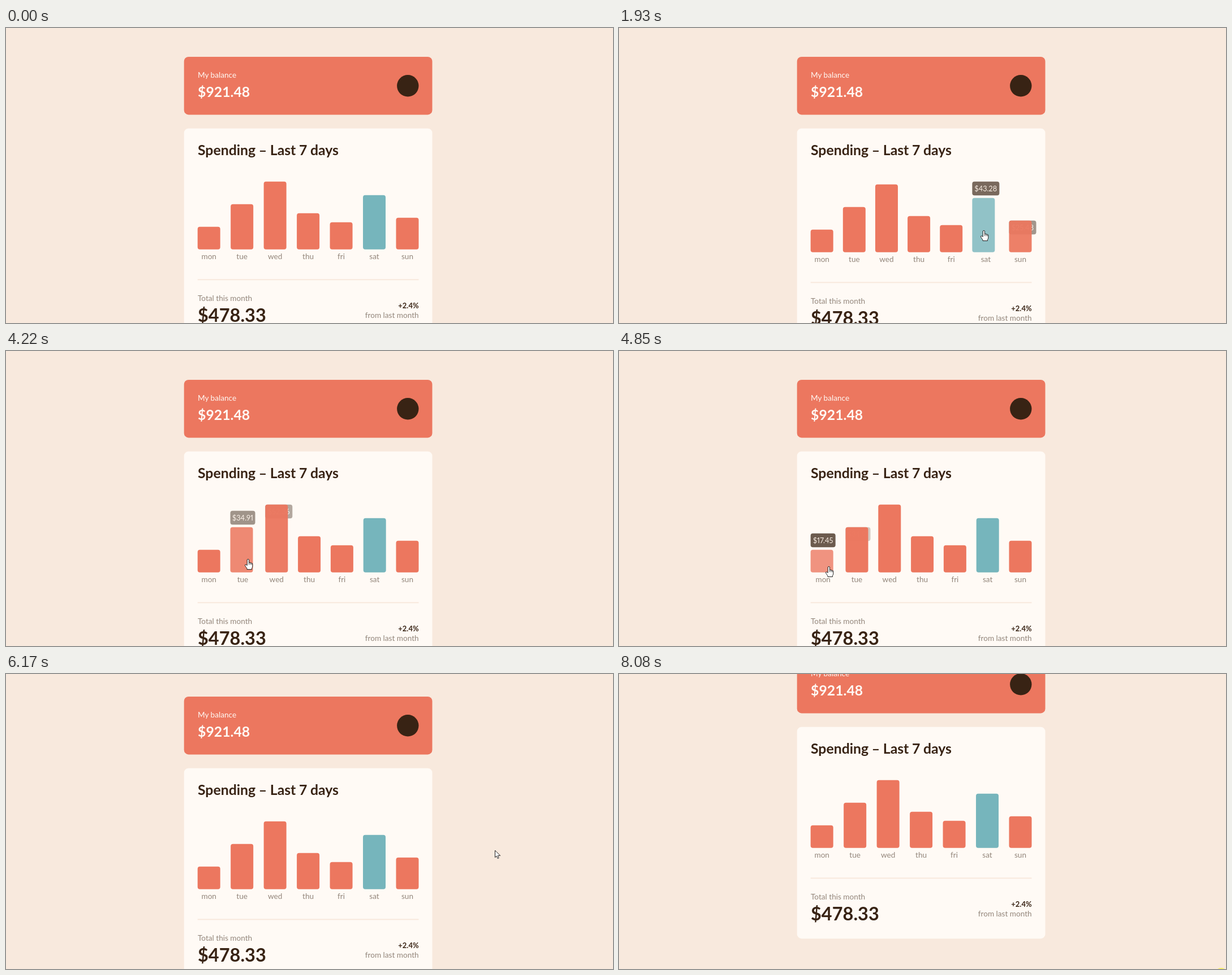
These frames come from a looping animation (1073x522 px, 8.15 s). An HTML page:

```html
<!DOCTYPE html>
<html lang="en">
<head>
<meta charset="utf-8">
<title>Spending chart</title>
<style>
  html, body { margin: 0; width: 100%; height: 100%; overflow: hidden; background: #f8e9dd; }
  svg { display: block; width: 100%; height: 100%; }
  text { font: 13.6px Lato, "Open Sans", sans-serif; fill: #93867b; }
  .light { fill: #fffaf5; }
  .dark { fill: #382314; }
  .coral { fill: #ec775f; }
  .cyan { fill: #76b5bc; }
  .bold { font-weight: 700; }
  .mid { text-anchor: middle; }
  .end { text-anchor: end; }
  .tip text { font-size: 12.7px; font-variant-numeric: proportional-nums; fill: #f8e9dd; }
  .cursor path { fill: #fff; stroke: #222; stroke-linejoin: round; stroke-linecap: round; }
</style>
</head>
<body>
<svg viewBox="0 0 1073 522">
  <g id="page">
    <rect class="coral" x="314.7" y="51" width="438.8" height="102.4" rx="8"/>
    <text class="light" x="339" y="88">My balance</text>
    <text class="light bold" x="339" y="122" style="font-size:24.8px">$921.48</text>
    <circle class="dark" cx="710.3" cy="102.3" r="19.2"/>

    <rect id="card" class="light" x="314.7" y="177.7" width="438.8" height="374.5" rx="8"/>
    <text class="dark bold" x="339" y="225" style="font-size:24.8px;word-spacing:-.4px">Spending – Last 7 days</text>
    <g id="lower">
      <g id="chart"></g>
      <rect x="338.7" y="444.3" width="390.8" height="2" fill="#f8e9dd"/>
      <text x="339" y="483">Total this month</text>
      <text class="dark bold" x="339" y="519.5" style="font-size:32.5px">$478.33</text>
      <text class="dark bold end" x="729.6" y="496" style="font-size:13px">+2.4%</text>
      <text class="end" x="729.6" y="513">from last month</text>
    </g>
  </g>
  <circle id="spot" cx="1064.5" cy="531.5" r="11.5" fill="#f4ee62"/>
  <g id="arrow" class="cursor">
    <path d="M.5 .5V12.6L3.2 10.1L5.2 14.5L7.2 13.6L5.3 9.3H9.3Z"/>
  </g>
  <g id="hand" class="cursor">
    <path d="M-1.7 11V2a1.6 1.6 0 0 1 3.2 0V6.6q1.6-.8 2.5.4q1.5-.7 2.2.6q1.6-.3 1.6 1.5V13q0 2-1.3 3.4V18.5H-2V16.8Q-3 15.4-5.5 11.7q-.6-2 1.3-1.7Z"/>
    <path d="M1.5 6.8v3M4 7.2v2.7M6.2 7.7v2.3" style="stroke-width:.8"/>
  </g>
</svg>
<script>
const LOOP = 8150, LEFT = 338.7, WIDTH = 390.8, BAR = 40, BASE = 391.8;
const TALLEST = 120, TIP = 24.5, TIP_SPACE = 29;
const FADE_IN = 300, FADE_OUT = 450, HOVER_LAG = 60;
const PAUSE = 3110, RESUME = 3530;

// day, price, bar height
const days = [
  ['mon', '$17.45', 40], ['tue', '$34.91', 80], ['wed', '$52.36', 120], ['thu', '$31.07', 64],
  ['fri', '$23.39', 48], ['sat', '$43.28', 96], ['sun', '$25.48', 56]
];

// key points of the pointer: time, x, y; every hover follows from them
const path = [
  [200, 975, 514], [550, 801, 447], [700, 801, 447],
  [1240, 730, 366], [1620, 691, 354], [1665, 670, 355], [1930, 645, 358],
  [2340, 631, 361], [2680, 555, 365], [3050, 513, 366], [3110, 491, 366],
  [3890, 455, 368], [4020, 437, 368], [4220, 428, 368], [4580, 377, 370],
  [5070, 366, 390], [5270, 560, 402], [5340, 614, 344], [5480, 700, 330],
  [5970, 864, 312], [6170, 864, 312], [6440, 834, 318], [6840, 834, 318], [7680, 1057, 512]
];

const $ = id => document.getElementById(id);
const clamp = v => Math.max(0, Math.min(1, v));
const move = (node, x, y) => node.setAttribute('transform', `translate(${x} ${y})`);
const show = (node, on) => node.setAttribute('visibility', on ? 'visible' : 'hidden');

// the whole picture rests between PAUSE and RESUME
const clock = t => t > PAUSE && t < RESUME ? PAUSE : t;

function add(parent, name, attrs, text = '') {
  const node = document.createElementNS('http://www.w3.org/2000/svg', name);
  for (const key in attrs) node.setAttribute(key, attrs[key]);
  node.textContent = text;
  return parent.appendChild(node);
}

const columns = days.map(([day, price, height]) => {
  const tipWidth = price.includes('1') ? 44 : 48;
  const group = add($('chart'), 'g', {});
  const tip = add(group, 'g', { class: 'tip' });
  add(tip, 'rect', { class: 'dark', width: tipWidth, height: TIP, rx: 4 });
  add(tip, 'text', { class: 'mid', x: tipWidth / 2, y: 17 }, price);
  const bar = add(group, 'rect', {
    class: day === 'sat' ? 'cyan' : 'coral', y: BASE - height, width: BAR, height, rx: 4
  });
  const label = add(group, 'text', { class: 'mid', y: 409 }, day);
  return { group, tip, bar, label, height, tipWidth };
});

function pointAt(t) {
  const i = path.findIndex(p => p[0] > t);
  if (i <= 0) return path.at(i).slice(1);
  const [t0, x0, y0] = path[i - 1], [t1, x1, y1] = path[i];
  const k = (t - t0) / (t1 - t0);
  return [x0 + (x1 - x0) * k, y0 + (y1 - y0) * k];
}

function columnAt([x, y]) {
  return columns.findIndex((c, i) => {
    const dx = x - LEFT - i * (WIDTH - BAR) / 6;
    return dx >= 0 && dx <= BAR && y <= BASE && y >= BASE - c.height;
  });
}

function findHovers() {
  const found = [];
  let last = -1;
  for (let t = 0; t < LOOP; t += 10) {
    const now = clock(t), index = columnAt(pointAt(now - HOVER_LAG));
    if (index === last) continue;
    if (last >= 0) found.at(-1).leave = now;
    if (index >= 0) found.push({ index, enter: now, leave: LOOP });
    last = index;
  }
  return found;
}
const hovers = findHovers();

function hoverLevel(index, t) {
  return Math.max(0, ...hovers.map(h => {
    if (h.index !== index || t < h.enter) return 0;
    const rise = clamp((Math.min(t, h.leave) - h.enter) / FADE_IN);
    return rise - Math.max(0, t - h.leave) / FADE_OUT;
  }));
}

function drawChart(t) {
  const hover = hovers.find(h => t >= h.enter && t < h.leave);
  const active = hover ? hover.index : -1;
  const widths = columns.map((c, i) => i === active ? c.tipWidth : BAR);
  const gap = (WIDTH - widths.reduce((a, b) => a + b)) / 6;
  const drop = hover ? Math.max(0, columns[active].height + TIP_SPACE - TALLEST) : 0;
  move($('lower'), 0, drop);
  $('card').setAttribute('height', 374.5 + drop);

  let x = LEFT;
  columns.forEach((c, i) => {
    const level = hoverLevel(i, t), on = i === active;
    move(c.group, x, 0);
    move(c.tip, 0, BASE - c.height - (on ? TIP_SPACE : 0));
    c.tip.setAttribute('opacity', level);
    c.bar.setAttribute('opacity', 1 - 0.3 * (on ? level : level * level));
    c.label.setAttribute('x', widths[i] / 2);
    // a fading tooltip slips behind its bar
    if (level > 0.95) c.group.append(c.tip); else c.group.prepend(c.tip);
    x += widths[i] + gap;
  });
}

function drawPointer(t) {
  const [x, y] = pointAt(t).map(Math.round);
  const visible = t >= 200 && t < 7815;
  const hand = x >= LEFT && x <= LEFT + WIDTH && y <= 410;
  move($('hand'), x, y);
  move($('arrow'), x, y);
  show($('hand'), visible && hand);
  show($('arrow'), visible && !hand);
}

function draw(now) {
  const t = clock(now % LOOP);
  const u = clamp((t - 6090) / 350);
  move($('page'), 0, -Math.round(84 * u * u * (3 - 2 * u)));
  drawChart(t);
  drawPointer(t);
  show($('spot'), t >= 8080);
}

const origin = performance.now();
function tick() {
  draw(performance.now() - origin);
  requestAnimationFrame(tick);
}
tick();
</script>
</body>
</html>
```
